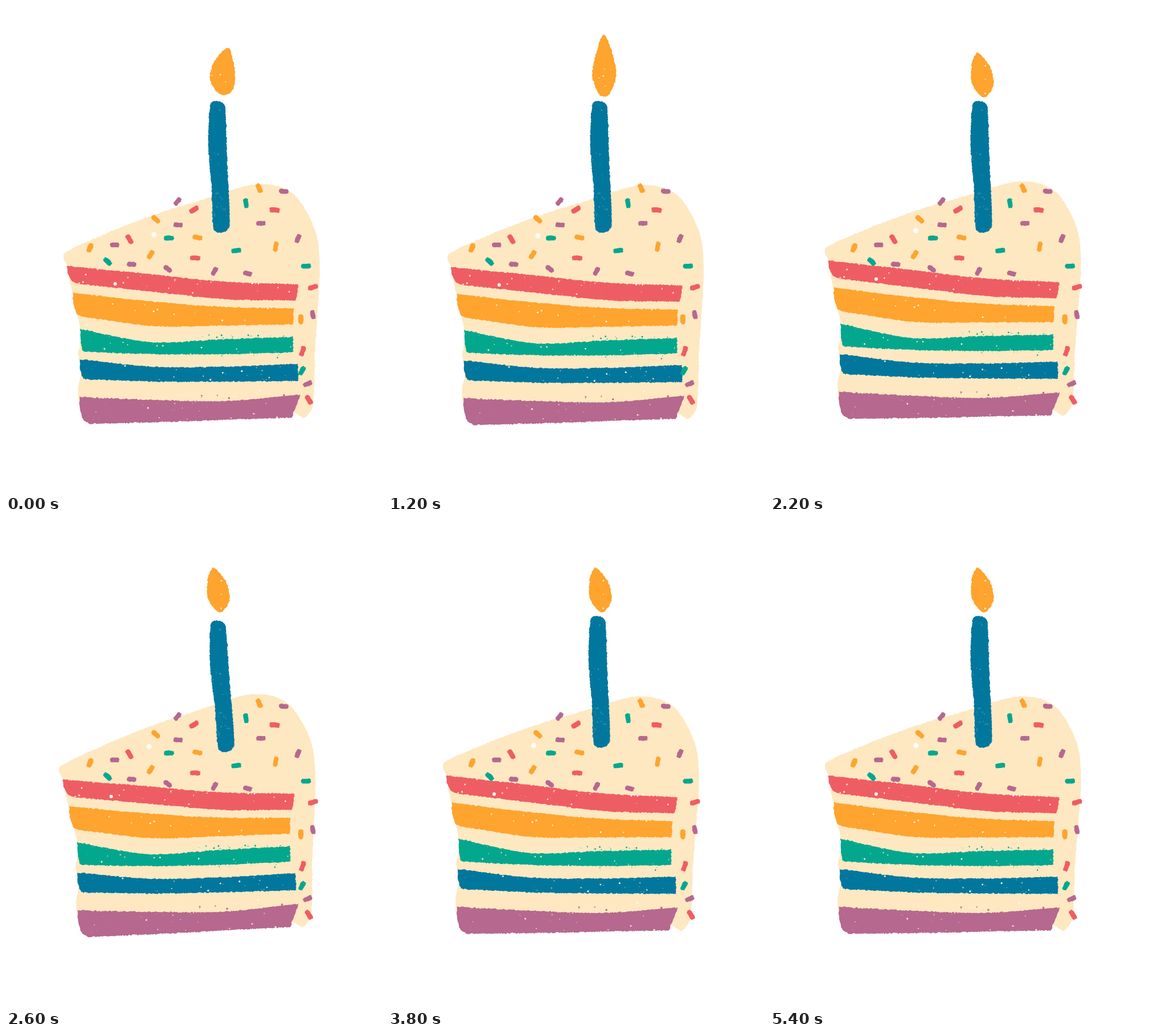
Write an HTML page with a canvas that moves like this. It is 658 by 852 pixels and loops after 5.61 s.

```html
<!DOCTYPE html>
<html lang="en">
<head>
<meta charset="utf-8">
<title>Cake slice</title>
<style>
html, body { margin: 0; width: 100%; height: 100%; overflow: hidden; background: #fff; }
canvas { display: block; }
</style>
</head>
<body>
<canvas id="stage" width="658" height="852"></canvas>
<script>
const ctx = document.getElementById('stage').getContext('2d');
const LOOP = 5610, STEP = 200, LAST = 27;
const RED = '#ef5d64', ORANGE = '#fea42f', GREEN = '#03a78e',
      BLUE = '#02779d', PURPLE = '#b6688f', CREAM = '#fde8c1', WHITE = '#fff';

let seed = 1;
const rand = () => {
  seed = (seed * 1664525 + 1013904223) >>> 0;
  return seed / 4294967296;
};
const spread = r => (rand() + rand() - 1) * r;
const range = (n, f) => Array.from({ length: n }, (_, i) => f(i));
const lerp = (a, b, t) => a + (b - a) * t;

// Smooth value through four numbers, with t from 0 to 1.
function wave(ys, t) {
  const i = Math.min(2, Math.floor(t * 3)), u = t * 3 - i;
  const at = k => k < 0 ? 2 * ys[0] - ys[1] : k > 3 ? 2 * ys[3] - ys[2] : ys[k];
  return spline(at(i - 1), at(i), at(i + 1), at(i + 2), 0.5, 0.5, u);
}

function spline(a, b, c, d, m1, m2, t) {
  const t2 = t * t, t3 = t2 * t;
  return (2 * t3 - 3 * t2 + 1) * b + (t3 - 2 * t2 + t) * m1 * (c - a)
    + (3 * t2 - 2 * t3) * c + (t3 - t2) * m2 * (d - b);
}

// Closed smooth curve through a few points.
function ring(flat) {
  const n = flat.length / 2, out = [];
  const at = i => { const k = (i + n) % n * 2; return [flat[k], flat[k + 1]]; };
  const dist = (p, q) => Math.hypot(q[0] - p[0], q[1] - p[1]);
  for (let i = 0; i < n; i++) {
    const [a, b, c, d] = range(4, k => at(i - 1 + k));
    const len = dist(b, c), steps = Math.ceil(len / 2);
    const m1 = Math.min(0.5, len / dist(a, c)), m2 = Math.min(0.5, len / dist(b, d));
    for (let s = 0; s < steps; s++)
      out.push([0, 1].map(k => spline(a[k], b[k], c[k], d[k], m1, m2, s / steps)));
  }
  return out;
}

// Sponge layer: wavy top and bottom, rounded lower left, square right end.
function band({ left, right, top, low }) {
  const n = 190;
  const upper = range(n, i => [lerp(left[0], right[0], i / n), wave(top, i / n)]);
  const lower = range(n, i => [lerp(right[1], left[1], i / n), wave(low, 1 - i / n)]);
  const end = range(14, i => [lerp(right[0], right[1], i / 14), lerp(top[3], low[3], i / 14)]);
  const round = range(16, i => {
    const t = i / 16;
    return [lerp(left[1], left[0], 1 - (1 - t) ** 2), lerp(low[0], top[0], t * t)];
  });
  return [...upper, ...end, ...lower, ...round];
}

function fill(points, color, chalk = 1.3) {
  const path = new Path2D();
  for (const [x, y] of points) path.lineTo(x + spread(chalk), y + spread(chalk));
  path.closePath();
  ctx.fillStyle = color;
  ctx.fill(path);
  return path;
}

function dot(x, y, r, color) {
  ctx.fillStyle = color;
  ctx.beginPath();
  ctx.arc(x, y, r, 0, 7);
  ctx.fill();
}

function flecks(x, y, w, h, count, color, path) {
  ctx.save();
  if (path) ctx.clip(path);
  for (let i = 0; i < count; i++)
    dot(x + rand() * w, y + rand() * h, 0.4 + rand() ** 3 * 1.4, color);
  ctx.restore();
}

const body = [102,433, 180,396, 260,365, 330,343, 437,312, 500,327, 540,390, 549,460,
  541,600, 537,700, 522,720, 505,712, 150,725, 130,700, 126,672, 131,640, 127,610,
  131,580, 127,550, 112,485, 107,455];

// left and right: x at the upper and lower corner; top and low: y at even steps
const layers = [
  { color: RED, left: [107, 135], right: [512, 507], top: [455, 468, 482, 487], low: [487, 500, 513, 515] },
  { color: ORANGE, left: [117, 137], right: [503, 503], top: [502, 516, 526, 529], low: [544, 560, 559, 557] },
  { color: GREEN, left: [130, 138], right: [502, 503], top: [565, 588, 583, 579], low: [605, 609, 609, 606] },
  { color: BLUE, left: [129, 140], right: [511, 511], top: [618, 631, 631, 626], low: [653, 657, 657, 656] },
  { color: PURPLE, left: [128, 150], right: [515, 500], top: [684, 689, 691, 680], low: [731, 728, 724, 720] }
];

// x, y and angle of each sprinkle
const sprinkles = [
  { color: RED, size: 18, at: [216,408,58, 329,356,-35, 470,357,5, 331,441,0,
    537,492,-15, 519,604,-72, 530,689,55] },
  { color: ORANGE, size: 17, at: [262,373,40, 443,319,65, 147,423,-65, 335,405,10,
    253,435,-58, 472,421,-80, 516,548,88] },
  { color: GREEN, size: 17, at: [420,345,83, 285,406,0, 403,428,-8, 178,447,42,
    525,455,0, 518,638,-60] },
  { color: PURPLE, size: 16, at: [300,342,-50, 486,324,5, 301,383,5, 446,380,0,
    511,407,-67, 190,418,0, 220,452,5, 283,460,40, 365,464,-60, 423,468,15,
    537,540,78, 528,661,-25] }
];

const wax = [358,171, 370,166, 383,174, 387,270, 391,386, 377,397, 363,390, 360,320, 354,240];
const flameRight = [389,73, 396,90, 401,122, 396,148, 380,156, 365,146, 357,122, 368,92];
const flameLeft = [365,82, 385,107, 391,138, 375,160, 356,142, 352,118, 356,92];
const flameTall = [378,50, 394,88, 399,124, 386,156, 371,156, 358,124, 363,88];

// cake and candle: dx, dy, rotation
const poses = [
  { cake: [0, 0, 0], candle: [0, 0, 0], flame: flameRight },
  { cake: [-8.5, -5.3, -0.0185], candle: [0.5, 8, -0.036], flame: flameLeft },
  { cake: [3.5, 2, 0], candle: [0, 0, 0], flame: flameTall },
  { cake: [-4, -7.3, 0.0141], candle: [-3, 0, 0], flame: flameLeft }
];

function moved([dx, dy, turn], px, py, draw) {
  ctx.save();
  ctx.translate(px + dx, py + dy);
  ctx.rotate(turn);
  ctx.translate(-px, -py);
  draw();
  ctx.restore();
}

function drawCake() {
  seed = 11;
  fill(ring(body), CREAM, 1);
  for (const layer of layers) {
    const y = layer.top[0];
    const path = fill(band(layer), layer.color);
    flecks(120, y, 395, 50, 40, CREAM, path);
  }
  flecks(330, 482, 185, 5, 14, WHITE);
  flecks(140, 480, 360, 230, 35, WHITE);
  flecks(330, 575, 165, 6, 16, GREEN);
  flecks(360, 608, 130, 16, 12, GREEN);
  flecks(140, 680, 350, 8, 10, PURPLE);
  dot(259, 400, 4.5, WHITE);
  dot(191, 486, 3, WHITE);
}

function drawSprinkles() {
  seed = 29;
  const bulge = v => Math.sign(v) * Math.sqrt(Math.abs(v));
  for (const { color, size, at } of sprinkles) {
    for (let i = 0; i < at.length; i += 3) {
      const a = size / 2, b = 2.4 + size / 9;
      moved([0, 0, at[i + 2] * Math.PI / 180], at[i], at[i + 1], () =>
        fill(range(28, k => {
          const t = k / 28 * Math.PI * 2;
          return [at[i] + a * bulge(Math.cos(t)), at[i + 1] + b * bulge(Math.sin(t))];
        }), color, 0.9));
    }
  }
}

function drawCandle() {
  seed = 47;
  const path = fill(ring(wax), BLUE);
  flecks(352, 170, 40, 150, 8, WHITE, path);
  flecks(358, 324, 34, 75, 45, 'rgba(253,232,193,.15)', path);
}

function drawFlame(pts) {
  seed = 63;
  const path = fill(ring(pts), ORANGE, 1.2);
  flecks(356, 100, 44, 58, 8, '#fff0d2', path);
}

function paint({ cake, candle, flame }) {
  ctx.fillStyle = WHITE;
  ctx.fillRect(0, 0, 658, 852);
  moved(cake, 259, 400, drawCake);
  drawSprinkles();
  moved(candle, 370, 170, drawCandle);
  drawFlame(flame);
}

let shown = -1;
const start = performance.now();
function tick() {
  const time = (performance.now() - start) % LOOP;
  const pose = Math.min(LAST, Math.floor(time / STEP)) % poses.length;
  if (pose !== shown) paint(poses[shown = pose]);
  requestAnimationFrame(tick);
}
tick();
</script>
</body>
</html>
```
